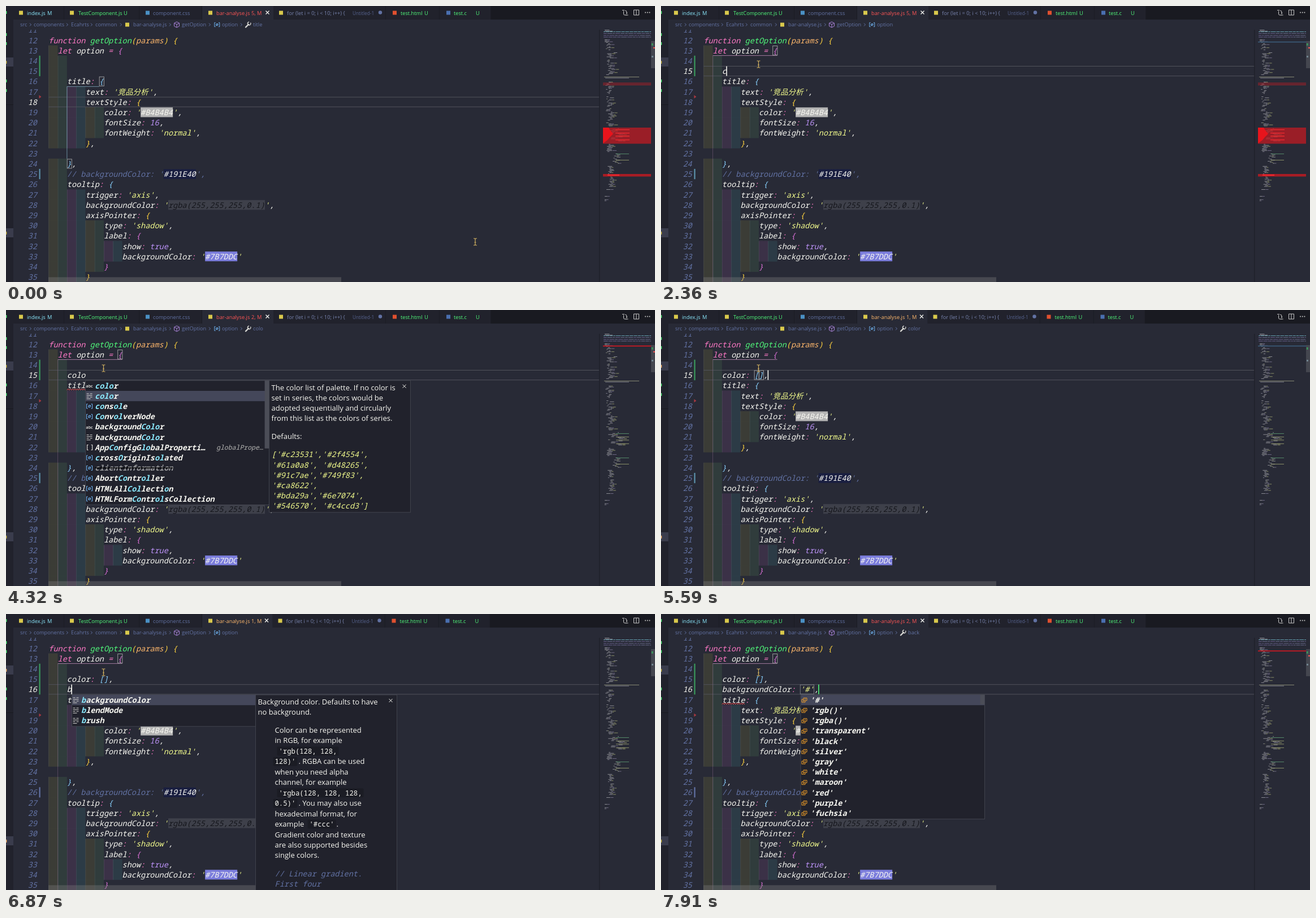
Recreate the animation shown at these times as an HTML page. Size 1148 by 488 pixels, loop 8 s.

```html
<!DOCTYPE html>
<html lang="en">
<head>
<meta charset="utf-8">
<title>Editor completion</title>
<style>
  html, body { margin: 0; width: 100%; height: 100%; overflow: hidden; background: #282a36; }
  svg { display: block; width: 1148px; height: 488px; }
  text { white-space: pre; }
  .mono { font: italic 500 13.57px "Noto Sans Mono", "Noto Sans CJK SC", monospace; }
  .item { font-weight: 600; }
  .ui { font: 9.25px "Open Sans", "Noto Sans", sans-serif; }
  .doc { font: 13px "Open Sans", "Noto Sans", sans-serif; }
  .inline { font: 500 12.25px "Noto Sans Mono", monospace; }
</style>
</head>
<body>
<svg viewBox="0 0 1148 488" xmlns="http://www.w3.org/2000/svg">
  <defs><clipPath id="clip"><rect x="13" y="42" width="1135" height="446"/></clipPath></defs>
  <g id="scene"></g>
  <g id="mouse" fill="none" stroke="#d0b060" stroke-width="1.2">
    <path d="M-3-6h2l1 1 1-1h2M-3 6h2l1-1 1 1h2M0-5V5M-1.5 1h3"/>
  </g>
</svg>
<script>
(() => {
const CW = 8.142, LH = 18.2, X0 = 75.3, LOOP = 8000;
const C = { bg: '#282a36', dark: '#21222c', white: '#f8f8f2', pink: '#ff79c6', green: '#50fa7b', orange: '#ffb86c',
  yellow: '#f1fa8c', purple: '#bd93f9', dim: '#6272a4', cyan: '#8be9fd', red: '#ff5555', blue: '#75beff' };
const BRACKETS = ['#ffd23f', '#da70d6', '#87cefa'];
const INDENTS = ['#ffff40', '#7fff7f', '#ff7fff', '#4fecec'];

const SOURCE = `function getOption(params) {
  let option = {
    
    
    title: {
        text: '竞品分析',
        textStyle: {
            color: '#B4B4B4',
            fontSize: 16,
            fontWeight: 'normal',
        },

    },
    // backgroundColor: '#191E40',
    tooltip: {
        trigger: 'axis',
        backgroundColor: 'rgba(255,255,255,0.1)',
        axisPointer: {
            type: 'shadow',
            label: {
                show: true,
                backgroundColor: '#7B7DDC'
            }
        }`.split('\n');

const rowTop = n => 51.4 + (n - 12) * LH;
const col = c => X0 + c * CW;
const esc = s => String(s).replace(/&/g, '&amp;').replace(/</g, '&lt;');
const rect = (x, y, w, h, fill, more = '') => `<rect x="${x}" y="${y}" width="${w}" height="${h}" fill="${fill}" ${more}/>`;
const path = (d, stroke, more = '') => `<path d="${d}" fill="none" stroke="${stroke}" ${more}/>`;
const text = (cls, x, y, s, fill, more = '') => `<text class="${cls}" x="${x}" y="${y}" fill="${fill}" ${more}>${esc(s)}</text>`;
const span = (s, fill, more = '') => `<tspan fill="${fill}" ${more}>${esc(s)}</tspan>`;
const panel = (x, y, w, h) => rect(x, y, w, h, C.dark, 'stroke="#484a54" stroke-width=".8"');

// Popup contents; asterisks enclose the matched letters.
const LISTS = {
  colo: { x: 140.6, w: 325, thumb: 120, items: ['abc|*colo*r', 'snip|*colo*r', 'var|*co*ns*ol*e', 'var|*Co*nv*ol*verNode',
    'abc|background*Colo*r', 'snip|background*Colo*r', 'mod|App*Co*nfigG*lo*balProperti…', 'var|*c*ross*O*riginIs*ol*ated',
    'old|clientInformation', 'var|Abort*Co*ntr*ol*ler', 'var|HTMLAll*Col*lecti*o*n', 'var|HTMLForm*Co*ntr*ol*sCollection'] },
  b: { x: 116.5, w: 325, items: ['snip|*b*ackgroundColor', 'snip|*b*lendMode', 'snip|*b*rush'] },
  ba: { x: 116.5, w: 325, items: ['snip|*ba*ckgroundColor'] },
  bac: { x: 116.5, w: 325, items: ['snip|*bac*kgroundColor'] },
  back: { x: 116.5, w: 325, items: ['snip|*back*groundColor'] },
  values: { x: 247, w: 325.5, thumb: 17, items: ['#', 'rgb()', 'rgba()', 'transparent', 'black', 'silver', 'gray', 'white',
    'maroon', 'red', 'purple', 'fuchsia'].map(v => `enum|'${v}'`) },
};

// Each line: x offset, baseline, style, text.
const DOCS = {
  emmet: { h: 55, lines: [[4, 17, 'grey', 'Emmet Abbreviation'], [5, 48, 'doc', '<col />']] },
  palette: { h: 233, lines: [
    ...['The color list of palette. If no color is', 'set in series, the colors would be', 'adopted sequentially and circularly',
      'from this list as the colors of series.'].map((s, i) => [4, 17 + i * 18.2, 'doc', s]),
    [4, 103.5, 'doc', 'Defaults:'],
    ...["['#c23531','#2f4554',", "'#61a0a8', '#d48265',", "'#91c7ae','#749f83',", "'#ca8622',", "'#bda29a','#6e7074',",
      "'#546570', '#c4ccd3']"].map((s, i) => [4, 135.5 + i * 18.2, 'code', s])] },
  background: { h: 350, lines: [
    [4, 17, 'doc', 'Background color. Defaults to have'], [4, 35.4, 'doc', 'no background.'],
    ...['Color can be represented', 'in RGB, for example', "@7'rgb(128, 128,", "@0128)'", 'when you need alpha', 'channel, for example',
      "@7'rgba(128, 128, 128,", "@00.5)'", 'hexadecimal format, for', 'example', 'Gradient color and texture',
      'are also supported besides', 'single colors.'].map((s, i) => s[0] === '@'
        ? [34 + +s[1], 67 + i * 18.45, 'inline', s.slice(2)] : [34, 67 + i * 18.45, 'doc', s]),
    [76, 122.4, 'doc', '. RGBA can be used'], [76, 196.2, 'doc', '. You may also use'],
    [95, 233, 'inline', "'#ccc'"], [143, 233, 'doc', '.'],
    [34, 320.5, 'note', '// Linear gradient.'], [34, 338.7, 'note', 'First four']] },
};

// Cumulative state changes: time, patch.
const EVENTS = [
  [0, { line15: '    ', cur: 18, caret: 0, box: 'title', crumb: 'title', errors: 5, list: '', sel: 0, doc: '', squiggle: 0,
    oldErrors: 1, mark: '', extra: null }],
  [860, { cur: 15, caret: 4 }], [900, { box: 'option', mark: '#3b5a78' }], [1040, { crumb: '' }],
  [1360, { caret: 0 }], [1840, { caret: 4 }],
  [2260, { line15: '    c', caret: 5 }], [2380, { line15: '    co', caret: 6 }], [2500, { line15: '    col', caret: 7 }],
  [2590, { squiggle: 1, mark: '#d01822' }],
  [2810, { line15: '    colo', caret: 8 }], [2870, { list: 'colo' }], [2940, { doc: 'emmet' }],
  [3250, { crumb: 'colo' }], [3390, { caret: 0 }], [3570, { errors: 2 }],
  [3710, { sel: 1, doc: '', caret: 8 }], [3800, { oldErrors: 0 }], [3910, { doc: 'palette' }], [4320, { caret: 0 }],
  [4400, { line15: '    color: [],', caret: 11, list: '', doc: '', sel: 0, squiggle: 0 }],
  [4500, { box: 'array', mark: '#3b5a78' }], [4700, { crumb: 'color' }], [4890, { caret: 0 }],
  [5040, { errors: 1 }], [5170, { caret: 11 }],
  [5590, { caret: 14 }], [5730, { box: 'option', crumb: '' }], [6120, { caret: 0 }],
  [6430, { extra: '    ', cur: 16, caret: 4 }], [6560, { extra: '    b', caret: 5 }], [6660, { list: 'b', mark: '' }],
  [6870, { doc: 'background' }],
  [6950, { extra: '    ba', caret: 6, list: 'ba' }], [7040, { extra: '    bac', caret: 7, list: 'bac' }],
  [7130, { extra: '    back', caret: 8, list: 'back' }], [7230, { errors: 2, squiggle: 1, mark: '#d01822' }],
  [7330, { crumb: 'back' }], [7560, { caret: 0 }],
  [7650, { extra: "    backgroundColor: '#',", caret: 25, list: '', doc: '' }], [7820, { list: 'values' }],
];

function tokens(line, depth) {
  const out = [], chips = [];
  let inString = false, inComment = false;
  for (const m of line.matchAll(/#[0-9A-F]{6}|rgba\([^)]*\)|\/\/|'|\w+|\s+|./gu)) {
    const s = m[0];
    let fill = C.white;
    if (s === '//') inComment = true;
    if (/^(#.{6}|rgba)/.test(s)) {
      const faint = s[0] === 'r';
      chips.push([m.index, s.length, faint ? '#3e404a' : s]);
      fill = faint ? '#15161c' : C.white;
    } else if (inComment) fill = C.dim;
    else if (s === "'") { inString = !inString; fill = C.yellow; }
    else if (inString) fill = C.yellow;
    else if (/^(function|let|:|=)$/.test(s)) fill = C.pink;
    else if (s === 'getOption') fill = C.green;
    else if (s === 'params') fill = C.orange;
    else if (/^(true|\d+)$/.test(s)) fill = C.purple;
    else if (/[{(\[]/.test(s)) fill = BRACKETS[depth++ % 3];
    else if (/[})\]]/.test(s)) fill = BRACKETS[--depth % 3];
    out.push(span(s, fill));
  }
  return { html: out.join(''), chips, depth };
}

function icon(kind, x, y) {
  if (kind === 'abc') return text('ui', x + 1, y + 3, 'abc', C.white, 'style="font-size:7px;font-weight:600"');
  if (kind === 'snip') return path(`M${x + 2} ${y - 4}h4m2 0h4M${x + 2} ${y - 1}h10M${x + 2} ${y + 2}h4m2 0h4M${x + 2} ${y + 5}h7`, '#d8d8d4');
  if (kind === 'mod') return path(`M${x + 5} ${y - 4.5}h-2v9h2m5-9h2v9h-2`, '#d8d8d4', 'stroke-width="1.2"');
  if (kind === 'enum') return path(`M${x + 5} ${y - 3.5}h6v4.5h-6zM${x + 5} ${y - 1}h-3v5h6v-3M${x + 7} ${y - 1.5}h2M${x + 4} ${y + 2}h2`, '#ee9d28');
  return path(`M${x + 4} ${y - 4}h-2v8h2m6-8h2v8h-2M${x + 5} ${y + 2}l4-4`, C.blue)
    + `<circle cx="${x + 7}" cy="${y}" r="2" fill="none" stroke="${C.blue}"/>`;
}

function popup(s) {
  if (!s.list) return '';
  const { x, w, thumb, items } = LISTS[s.list], y = rowTop(s.cur + 1) + .6;
  let out = panel(x, y, w, items.length * LH + 1.2);
  items.forEach((item, i) => {
    const [kind, label] = item.split('|'), ry = y + i * LH, old = kind === 'old';
    if (i === s.sel) out += rect(x + .5, ry, w - 1, LH, '#44475a');
    out += icon(kind, x, ry + 9);
    const spans = label.split('*').map((p, k) => span(p, k % 2 ? C.cyan : old ? '#999a9c' : C.white, k % 2 ? 'font-weight="700"' : ''));
    out += `<text class="mono item" x="${x + 16.5}" y="${ry + 13.8}" ${old ? 'text-decoration="line-through"' : ''}>${spans.join('')}</text>`;
    if (kind === 'mod') out += text('mono', 372, ry + 13, 'globalPrope…', '#b4b4b2', 'style="font-size:11.5px"');
  });
  if (thumb) out += rect(x + w - 8, y, 8, thumb, '#4b4d57');
  return out + (s.doc ? docPanel(DOCS[s.doc], x + w, y) : '');
}

function docPanel({ h, lines }, x, y) {
  const styles = { grey: ['mono', '#a9a9a8'], code: ['mono', C.yellow], note: ['mono', C.dim], doc: ['doc', C.white], inline: ['inline', C.white] };
  let out = panel(x, y, 250, h);
  for (const [dx, dy, kind, s] of lines) {
    if (kind === 'inline') out += rect(x + dx - 3, y + dy - 12.5, s.length * 7.35 + 6, 16, '#1b1c24', 'rx="2"');
    out += text(styles[kind][0], x + dx, y + dy, s, styles[kind][1]);
  }
  return out + path(`M${x + 236} ${y + 7}l6 6m0-6l-6 6`, C.white);
}

function editor(s) {
  const lines = SOURCE.slice();
  lines[3] = s.line15;
  if (s.extra !== null) lines.splice(4, 0, s.extra);
  const titleLine = s.extra === null ? 16 : 17;
  let out = text('mono', 55, rowTop(11) + 14.1, 11, C.dim, 'text-anchor="end"'), depth = 0;
  lines.slice(0, 24).forEach((line, i) => {
    const n = i + 12, y = rowTop(n), indent = line.match(/^ */)[0].length / 2;
    for (let k = 0; k < indent; k++) {
      out += rect(col(k * 2), y, 2 * CW, LH + .1, INDENTS[k % 4], 'opacity=".085"') + rect(col(k * 2), y, .8, LH, '#fff', 'opacity=".1"');
    }
    const t = tokens(line, depth);
    depth = t.depth;
    for (const [c, len, fill] of t.chips) out += rect(col(c), y + .5, len * CW, LH - 1, fill);
    out += `<text class="mono" x="${X0}" y="${y + 14.1}">${t.html}</text>`;
    out += text('mono', 55, y + 14.1, n, n === s.cur ? C.white : C.dim, 'text-anchor="end"');
  });
  const cy = rowTop(s.cur);
  out += rect(X0, cy, 975, 1, '#50525b') + rect(X0, cy + LH - 1, 975, 1, '#50525b');

  const bracketBox = (n, c) => rect(col(c) + .3, rowTop(n) + 1, CW, LH - 2, 'none', 'stroke="#a4a5a6" stroke-width=".9"');
  if (s.box === 'title') {
    out += path(`M${col(11)} 142.4H${col(4)}V270`, '#7fa8bb', 'opacity=".8"') + bracketBox(16, 11) + bracketBox(24, 4);
  } else {
    out += path(`M${col(16)} 87.6H${col(2)}`, '#ad82aa', 'opacity=".9"') + path(`M${col(2)} 88V488`, '#ad82aa', 'opacity=".35"');
    out += s.box === 'array' ? bracketBox(15, 11) + bracketBox(15, 12) : bracketBox(13, 15);
  }
  if (s.extra && s.extra.includes('#')) out += rect(col(21), cy + 1, 3 * CW, LH - 2, 'none', 'stroke="#8a8c92" stroke-width=".8"');
  if (s.squiggle) out += path(`M${col(4)} ${rowTop(titleLine) + 17.5}` + 'l2-2.4 2 2.4'.repeat(10), C.red);
  if (s.caret) out += rect(col(s.caret) - .7, cy + .5, 1.6, LH - 1, s.caret === 25 ? C.green : C.white);

  const down = s.extra === null ? 0 : LH;
  out += rect(58.5, rowTop(14), 2.2, 2 * LH + down, '#3a9a5c') + rect(58.5, rowTop(25) + down, 2.2, LH, down ? '#6272a4' : '#5c93ac');
  return out + `<path d="M58.5 ${157.5 + down}l4 3-4 3z" fill="#a83a42"/>`;
}

// Sections: first y, last y, smallest indent, indent spread, longest line.
const MINI = [[42, 44, 2, 0, 30], [59, 63, 2, 0, 16], [64, 77, 4, 6, 16], [82, 92, 4, 14, 24], [95, 121, 4, 10, 16], [134, 156, 3, 7, 13],
  [160, 177, 5, 9, 15], [181, 203, 4, 10, 15], [206, 213, 4, 6, 22], [216, 240, 8, 20, 20], [244, 258, 5, 5, 20],
  [261, 278, 16, 10, 14], [283, 297, 7, 4, 18], [300, 320, 7, 9, 15], [324, 325, 5, 0, 14], [336, 337, 2, 0, 12], [342, 344, 1, 1, 8]];

function buildMini() {
  let seed = 11, out = '';
  const rnd = () => (seed = seed * 16807 % 2147483647) / 2147483647;
  const dash = (x, y, w, fill) => out += rect(x.toFixed(1), y.toFixed(1), w.toFixed(1), 1, fill, 'opacity=".6"');
  for (const y of [45, 48, 51.5, 54.5]) {
    for (let x = 1057; x < 1140;) {
      const w = 3 + rnd() * 7;
      dash(x, y, Math.min(w, 1141 - x), y === 45 ? C.cyan : rnd() < .5 ? '#9094c0' : '#8e7fc0');
      x += w + 1;
    }
  }
  dash(1058, 125, 62, '#c4c59a');
  dash(1060, 126.8, 42, '#b8b8c0');
  for (const [y0, y1, pad, spread, len] of MINI) {
    for (let y = y0; y <= y1; y += 1.85) {
      const x = 1057 + pad + rnd() * spread, w = 2 + rnd() * len * .8;
      dash(x, y, w * .55, '#c8c8cc');
      if (rnd() < .6) dash(x + w * .6, y, w * .4, rnd() < .5 ? '#c9cf86' : '#9d92b8');
    }
  }
  for (const y of [218, 224, 229.5, 236, 261, 272]) dash(1079, y, 23, y === 218 || y === 261 ? '#6ec487' : '#c9cf86');
  return out;
}
const MINIMAP = buildMini();

function minimap(s) {
  let out = rect(1049, 42, 1.4, 446, '#1f2029') + MINIMAP;
  if (s.mark) out += rect(1056, s.extra === null ? 62.8 : 64.5, 85, 1.7, s.mark);
  if (s.oldErrors) {
    out += rect(1056, 135.8, 85, 1.4, '#9c2028') + rect(1056, 138.6, 85, 1.4, '#9c2028');
    out += rect(1056, 215, 85, 28.5, '#c01a22', 'opacity=".75"') + '<path d="M1056 215h10l3 5 5 6-6 6-4 5-8 6z" fill="#e8141c"/>';
    for (const y of [218, 224, 229.5, 236]) out += rect(1078, y, 25, 1.3, '#ee2a30');
    out += rect(1056, 297, 85, 4.5, '#a81c24') + rect(1064, 298, 21, 2, '#ee2a30');
  }
  out += rect(1141, 62, 7, 48, '#44464f') + rect(1142, 66, 2.5, 4, '#3a9a5c') + rect(1142, 88, 3, 3, '#70838f');
  if (s.errors > 1) out += rect(1145, 73, 3, 2, C.red);
  return out + rect(75, 479.5, 518, 8.5, '#797979', 'opacity=".38"');
}

function workbench(s) {
  const hot = s.errors > 1 ? C.red : C.orange, dx = s.errors > 1 ? 0 : -1.5, yellow = '#d9c94c';
  const badge = (x, y, fill) => rect(x, y - 3.5, 7, 7, fill);
  const label = (x, str, fill, more) => text('ui', x, 15.5, str, fill, more);
  let out = rect(0, 0, 1148, 24, '#191a21');
  for (const [x, end] of [[0, 103], [103, 236], [236, 347], [473 + dx, 672 + dx], [672 + dx, 767 + dx], [767 + dx, 858 + dx]]) {
    out += rect(x, 0, end - x - .7, 24, C.dark);
  }
  out += rect(347, 0, 126 + dx, 24, C.bg);
  out += badge(23, 12, yellow) + label(37, 'index.js', C.cyan) + label(73, 'M', C.cyan);
  out += badge(113, 12, yellow) + label(128, 'TestComponent.js', C.green) + label(208, 'U', C.green);
  out += badge(247, 12, '#4a90c4') + label(260, 'component.css', C.dim);
  out += badge(358, 12, yellow) + label(372, 'bar-analyse.js', hot) + label(434, s.errors + ', M', hot);
  out += path(`M${459.5 + dx} 8.5l6 6m0-6l-6 6`, C.white, 'stroke-width="1.2"');
  out += `<g transform="translate(${dx} 0)">` + badge(483, 12, yellow) + label(497, 'for (let i = 0; i < 10; i++) {', '#7884ae')
    + label(613, 'Untitled-1', '#56638f', 'style="font-size:8.25px"') + `<circle cx="662" cy="11.5" r="3.2" fill="${C.dim}"/>`
    + badge(684, 12, '#e0502f') + label(698, 'test.html', C.green) + label(740, 'U', C.green)
    + badge(779, 12, '#4a6fb0') + label(792, 'test.c', C.green) + label(831, 'U', C.green) + '</g>';
  out += path('M1092.5 9v5q0 2 2 2h3M1098 14v-3q0-3-3-3M1090 7.5h4M1096.5 16h4M1098 11v3', '#c8c8c8') + path('M1110.5 7h9v9h-9zM1115 7v9', '#c8c8c8');
  for (const x of [1131, 1134.7, 1138.4]) out += `<circle cx="${x}" cy="11.5" r="1" fill="#c8c8c8"/>`;

  out += rect(13, 24, 1135, 18, C.bg);
  const crumb = (x, str) => text('ui', x, 36.3, str, C.dim);
  for (const [x, str] of [[25, 'src'], [49, 'components'], [115, 'Ecahrts'], [158, 'common'], [225, 'bar-analyse.js'], [311, 'getOption'], [382, 'option']]) {
    out += crumb(x, str);
  }
  for (const x of [42, 107, 150, 202, 289, 359].concat(s.crumb ? [415] : [])) out += path(`M${x} 30.5l2.5 2.5-2.5 2.5`, C.dim);
  out += badge(211, 33, yellow) + path('M302 28l4.5 2.3v5.4l-4.5 2.3-4.5-2.3v-5.4zM297.5 30.3l4.5 2.3 4.5-2.3M302 32.6V38', '#a982d8')
    + `<g transform="translate(367 33) scale(.9)">${icon('var', 0, 0)}</g>`;
  if (s.crumb) {
    out += path('M424 37.5l5-5', '#d8d8d4', 'stroke-width="2.4" stroke-linecap="round"')
      + path('M432.5 29.5a2.8 2.8 0 1 1-2.5-1.3', '#d8d8d4', 'stroke-width="1.4"') + crumb(437, s.crumb);
  }

  out += rect(0, 24, 13, 464, C.dark) + rect(0, 91, 13, 16, '#3a3c4c') + rect(0, 393, 13, 16, '#3a3c4c') + rect(0, 174, 13, 1, '#191a21');
  const side = hot === C.red ? '#c9b43c' : C.orange;
  for (const [y, fill] of [[9, C.green], [48, C.green], [64, C.green], [97, side], [130, C.green], [147, C.green], [399, side]]) {
    out += rect(0, y, 1.3, 5, fill);
  }
  return out;
}

// Pointer waypoints: time, x, y.
const POINTER = [[30, 830, 417], [600, 230, 86], [810, 168, 114], [1040, 168, 114], [1190, 171, 103], [1360, 171, 103], [1480, 172.5, 103]];

function pointerAt(t) {
  const i = POINTER.findIndex(p => p[0] > t);
  if (i < 1) return (i ? POINTER[POINTER.length - 1] : POINTER[0]).slice(1);
  const [t0, x0, y0] = POINTER[i - 1], [t1, x1, y1] = POINTER[i], u = (t - t0) / (t1 - t0), e = u * u * (3 - 2 * u);
  return [x0 + (x1 - x0) * e, y0 + (y1 - y0) * e];
}

const scene = document.getElementById('scene'), mouse = document.getElementById('mouse');
let shown = -1;

function draw(t) {
  const past = EVENTS.filter(([at]) => at <= t);
  if (past.length !== shown) {
    shown = past.length;
    const s = Object.assign({}, ...past.map(e => e[1]));
    scene.innerHTML = rect(0, 0, 1148, 488, C.bg) + `<g clip-path="url(#clip)">${editor(s)}${minimap(s)}${popup(s)}</g>` + workbench(s);
  }
  mouse.setAttribute('transform', `translate(${pointerAt(t)})`);
}

const start = performance.now();
function tick() {
  draw(Math.max(0, performance.now() - start) % LOOP);
  requestAnimationFrame(tick);
}
tick();
})();
</script>
</body>
</html>
```
